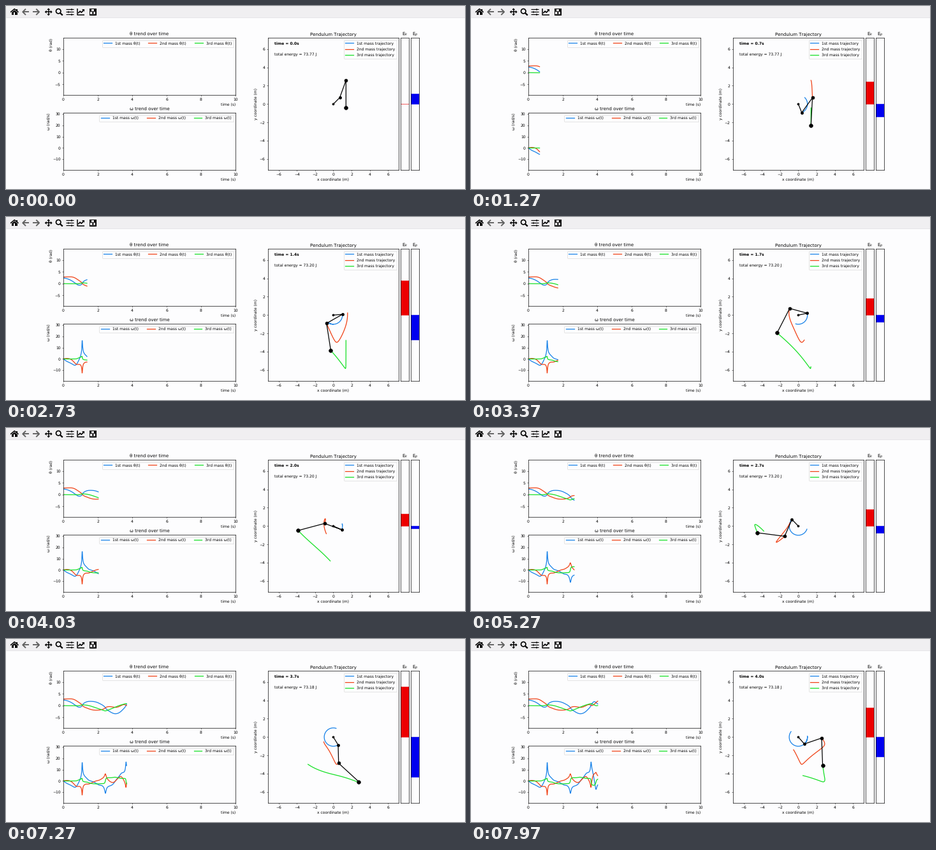
Write a matplotlib script that moves like this. It is 720x288 px and loops after 8000 ms.

```python
import numpy as np
import matplotlib.pyplot as plt
from matplotlib.animation import FuncAnimation
from matplotlib.patches import Circle, Polygon, Rectangle

W, H, DPI = 720, 288, 45
FRAMES, LOOP = 240, 8000
PAPER, CHROME = "#fdfdfe", "#f0eff1"
COLORS = ("#1480e8", "#f04014", "#14e024")
NAMES = ("1st mass", "2nd mass", "3rd mass")
plt.rcParams.update({"font.family": "DejaVu Sans", "text.hinting": "none",
                     "text.hinting_factor": 1, "axes.facecolor": PAPER,
                     "axes.titlesize": 11, "axes.titlepad": 6.6,
                     "axes.linewidth": 1.1, "legend.fontsize": 10.25,
                     "lines.linewidth": 2})

# --- triple pendulum: masses 2, 3, 4 on rods of length 1, 2, 3 --------------
G = 9.81
LEN = np.arange(1.0, 4.0)
MASS = LEN + 1
START = np.radians([135.0, 160.0, 0.0])
DT = 0.01
TRAIL = 65
BELOW = np.cumsum(MASS[::-1])[::-1]
COUPLE = np.minimum.outer(BELOW, BELOW) * np.outer(LEN, LEN)


def slope(s):
    th, om = s[:3], s[3:]
    d = th[:, None] - th[None, :]
    force = -(COUPLE * np.sin(d)) @ om**2 - BELOW * G * LEN * np.sin(th)
    return np.concatenate([om, np.linalg.solve(COUPLE * np.cos(d), force)])


def rk4(s, h):
    a = slope(s)
    b = slope(s + h / 2 * a)
    c = slope(s + h / 2 * b)
    d = slope(s + h * c)
    return s + h / 6 * (a + 2 * b + 2 * c + d)


count = int(4.2 / DT)
state = np.zeros((count, 6))
state[0, :3] = START
for k in range(1, count):
    state[k] = rk4(state[k - 1], DT)
time = np.arange(count) * DT
theta, omega = state[:, :3], state[:, 3:]
px = np.cumsum(LEN * np.sin(theta), axis=1)
py = np.cumsum(-LEN * np.cos(theta), axis=1)
vx = np.cumsum(LEN * np.cos(theta) * omega, axis=1)
vy = np.cumsum(LEN * np.sin(theta) * omega, axis=1)
kinetic = (vx**2 + vy**2) @ MASS / 2
potential = G * py @ MASS

# --- layout ----------------------------------------------------------------
fig = plt.figure(figsize=(W / DPI, H / DPI), dpi=DPI, facecolor=PAPER)
TOP, BOTTOM = 50.4, 258.3


def panel(x, width, y0=TOP, y1=BOTTOM):
    return fig.add_axes([x / W, 1 - y1 / H, width / W, (y1 - y0) / H])


def plots(ax, suffix):
    return [ax.plot([], [], color=c, label=f"{n} {suffix}")[0]
            for c, n in zip(COLORS, NAMES)]


def trend(y0, symbol, unit, lim, step):
    ax = panel(90, 270, y0, y0 + 90)
    ax.set(xlim=(0, 10), ylim=lim, title=f"{symbol} trend over time")
    ax.yaxis.set_major_locator(plt.MultipleLocator(step))
    ax.set_xlabel("time (s)", loc="right")
    ax.set_ylabel(f"{symbol} ({unit})", loc="top")
    lines = plots(ax, f"{symbol}(t)")
    ax.legend(loc="upper right", ncol=3)
    return lines


def meter(x, name, color):
    ax = panel(x, 13.4)
    ax.set(xlim=(0, 1), ylim=(-480, 480), xticks=[], yticks=[], title=name)
    return ax.bar([0.5], [0], width=1.2, color=color, edgecolor=color, lw=1)[0]


theta_lines = trend(TOP, "θ", "rad", (-9.6, 14.7), 5)
omega_lines = trend(BOTTOM - 90, "ω", "rad/s", (-19.7, 31), 10)

main = panel(410.6, 205.7)
main.set(xlim=(-7.2, 7.2), ylim=(-7.2, 7.2), title="Pendulum Trajectory",
         xlabel="x coordinate (m)", ylabel="y coordinate (m)")
trails = plots(main, "trajectory")
main.legend(loc="upper right")
rods, = main.plot([], [], color="black")
main.plot([0], [0], "o", color="black", ms=5)
bobs = [main.plot([], [], "o", color="black", ms=5 + 1.2 * m)[0]
        for m in MASS - 0.5]
clock = main.text(0.05, 0.95, "", weight="bold", transform=main.transAxes)
total = main.text(0.05, 0.87, "", transform=main.transAxes)

ek_bar = meter(618.8, "E$_k$", "#ec0000")
ep_bar = meter(634.6, "E$_p$", "#0000f0")

# --- window toolbar --------------------------------------------------------
ui = fig.add_axes([0, 0, 1, 1], zorder=-1)
ui.set(xlim=(0, W), ylim=(H, 0))
ui.axis("off")
MID = 9.3


def box(x, y, w, h, color="black"):
    ui.add_patch(Rectangle((x, y), w, h, color=color, lw=0))


def stroke(pts, w=1.5, color="black"):
    ui.plot(*zip(*pts), color=color, lw=w * 72 / DPI, solid_capstyle="butt")


def arrow(x, way):
    tip = x + 4.8 * way
    stroke([(x - 5 * way, MID), (tip, MID)], 1.9, "#606060")
    stroke([(x, MID - 4.7), (tip, MID), (x, MID + 4.7)], 1.9, "#606060")


box(0, 0, W, 17.5, CHROME)
stroke([(0, 17.5), (W, 17.5)], 0.7, "#dcdcdf")

# home
stroke([(7, 9.8), (13.3, 4.6), (19.6, 9.8)])
ui.add_patch(Polygon([(9, 10), (13.3, 6.4), (17.6, 10)], color="black", lw=0))
box(9, 9.9, 3.2, 4.4)
box(14.4, 9.9, 3.2, 4.4)
box(16.2, 4.8, 1.6, 3)
arrow(31, -1)
arrow(47.3, 1)
# pan
for turn in range(4):
    out = np.array([np.cos(turn * np.pi / 2), np.sin(turn * np.pi / 2)])
    side, hub = out[::-1] * 2.5, np.array([66.7, MID])
    stroke([hub, hub + out * 4])
    ui.add_patch(Polygon([hub + out * 6, hub + out * 3.2 + side,
                          hub + out * 3.2 - side], color="black", lw=0))
# zoom
ui.add_patch(Circle((82.2, 8.2), 3.7, fill=False, lw=2.7))
stroke([(84.8, 10.8), (88.8, 14.6)], 2.3)
# sliders
for row in range(3):
    y, knob = 5.4 + 3.9 * row, 100 + 2.5 * np.cos(row * np.pi)
    stroke([(94.3, y), (106, y)], 1.2)
    stroke([(knob - 0.9, y), (knob + 0.9, y)], 3.2)
# chart
stroke([(111.7, 4.4), (111.7, 13.6), (123.2, 13.6)])
stroke([(113.3, 11.2), (116.2, 8.2), (118.3, 10.2), (121.8, 6.3)], 1.7)
ui.add_patch(Polygon([(118.8, 5.2), (122.8, 5.2), (122.8, 9.2)], lw=0,
                     color="black"))
# save
box(131, 4.1, 10.6, 10.4)
box(132.3, 8.6, 8, 4.7, CHROME)
box(133.6, 5.3, 4.2, 2.2, CHROME)
ui.add_patch(Circle((136.3, 11), 1.5, color="black", lw=0))


def draw(i):
    k = round((0.0168 * i + 0.01) / DT) if i else 0
    for j in range(3):
        theta_lines[j].set_data(time[:k + 1], theta[:k + 1, j])
        omega_lines[j].set_data(time[:k + 1], omega[:k + 1, j])
        past = slice(max(0, k - TRAIL), k + 1)
        trails[j].set_data(px[past, j], py[past, j])
        bobs[j].set_data([px[k, j]], [py[k, j]])
    rods.set_data([0, *px[k]], [0, *py[k]])
    clock.set_text(f"time = {time[k]:.1f}s")
    total.set_text(f"total energy = {kinetic[k] + potential[k]:.2f} J")
    ek_bar.set_height(kinetic[k])
    ep_bar.set_height(potential[k])
    return []


anim = FuncAnimation(fig, draw, frames=FRAMES, interval=LOOP / FRAMES,
                     init_func=lambda: draw(0), repeat=True, repeat_delay=0)
plt.show()
```
